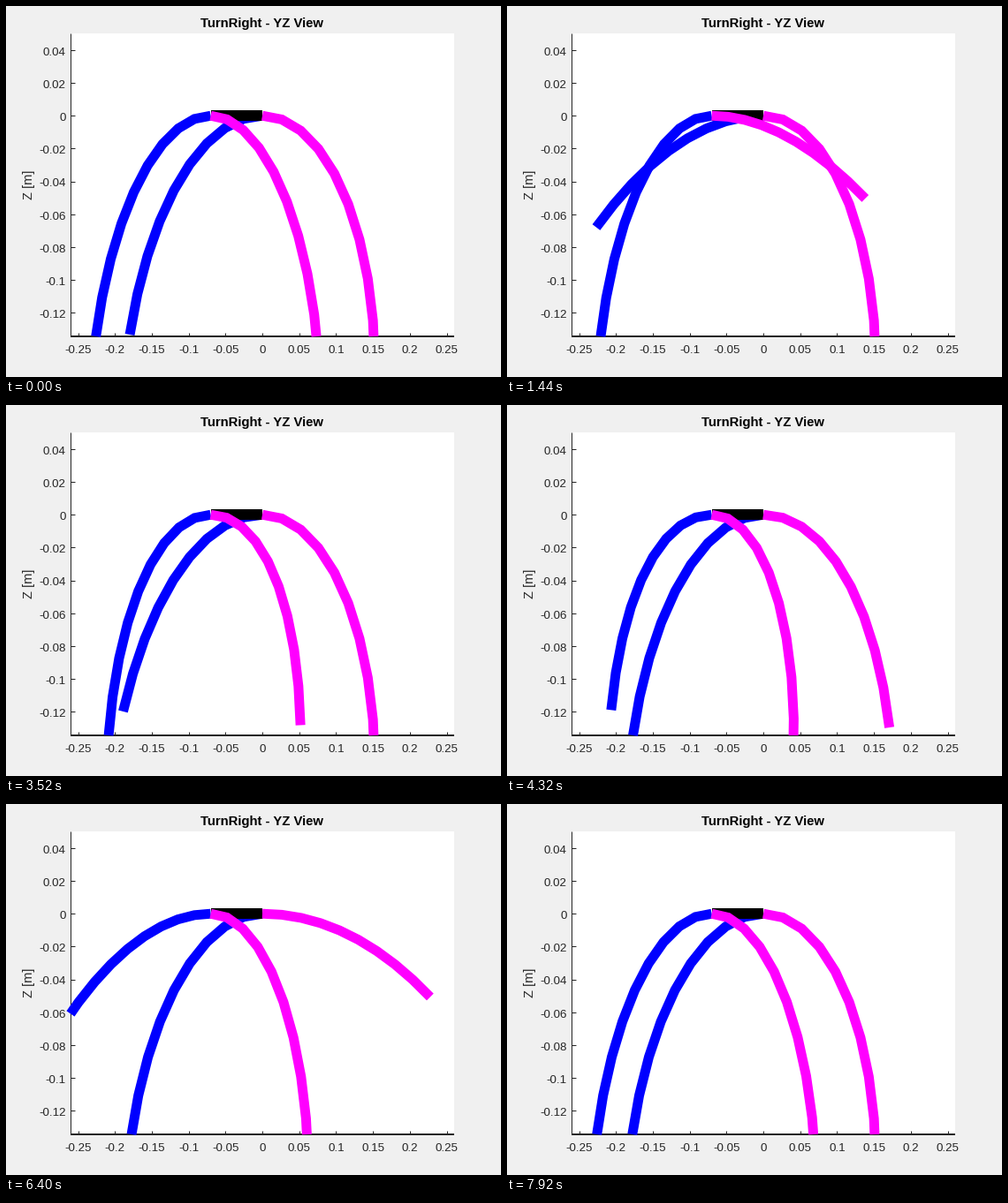
Write a matplotlib script that moves like this. It is 560x420 px and loops after 8 s.

```python
import numpy as np
import matplotlib.pyplot as plt
from matplotlib.animation import FuncAnimation

W, H, DPI = 560, 420, 100
FRAMES, INTERVAL = 100, 80
PT = 72 / DPI                      # points per pixel
LEFT, RIGHT, TOP, BOTTOM = 73, 507, 31, 374
X0, Z0, SX, SZ = 290, 124.2, 834, 1860
INK = "#262626"
SEGMENTS = 9
DROP, SPREAD = 49, 13.3            # pixels per segment: downward, sideways

plt.rcParams["font.family"] = "Liberation Sans"


class Leg:
    """Limb of constant curvature, bent down by v and sideways by u."""

    def __init__(self, ax, base, side, color, shift, reach, bend, lift,
                 u0=0.0, u1=0.0, gain=0.0, dip=0.0, z=1):
        self.base, self.side, self.shift, self.reach = base, side, shift, reach
        self.bend, self.lift = bend, lift
        self.u0, self.u1, self.gain, self.dip = u0, u1, gain, dip
        self.line, = ax.plot([], [], color=color, lw=11 * PT, zorder=z,
                             solid_capstyle="butt", solid_joinstyle="miter",
                             clip_on=False)

    def points(self, frame):
        phase = (frame + 1 + self.shift) % 100
        angle = np.pi * phase / 50
        s = max(np.sin(angle), 0.0)
        v = self.bend - self.lift * s ** 1.15
        u = (self.u0 + self.u1 * np.cos(angle) * (1 + self.gain * s)
             - self.dip * s * (1 - s))
        turn = np.hypot(u, v)
        th = (np.arange(SEGMENTS) + 0.5) * turn
        dx = self.reach * np.cos(th) + SPREAD * u / turn * np.sin(th)
        dz = DROP * v / turn * np.sin(th)
        x = self.base + self.side * np.concatenate(([0], np.cumsum(dx)))
        y = Z0 + np.concatenate(([0], np.cumsum(dz)))
        return clip(x, y)

    def update(self, frame):
        self.line.set_data(*self.points(frame))


def clip(x, y):
    """Cut the polyline where it first leaves the plot area."""
    for i in range(1, len(x)):
        t = 1.0
        if y[i] > BOTTOM:
            t = min(t, (BOTTOM - y[i - 1]) / (y[i] - y[i - 1]))
        if x[i] < LEFT:
            t = min(t, (LEFT - x[i - 1]) / (x[i] - x[i - 1]))
        if t < 1:
            end_x = x[i - 1] + t * (x[i] - x[i - 1])
            end_y = y[i - 1] + t * (y[i] - y[i - 1])
            return np.append(x[:i], end_x), np.append(y[:i], end_y)
    return x, y


def draw_axes(ax):
    ax.add_patch(plt.Rectangle((LEFT, TOP), RIGHT - LEFT, BOTTOM - TOP,
                               fc="white", ec="none", zorder=0))

    def rule(xs, ys, width=1):
        ax.plot(xs, ys, color=INK, lw=width * PT, zorder=0.5,
                solid_capstyle="butt")

    rule([LEFT, LEFT], [TOP, BOTTOM])
    rule([LEFT, RIGHT], [BOTTOM, BOTTOM], 2)
    size = 13.33 * PT
    for i in range(-5, 6):
        x = X0 + i * 0.05 * SX
        rule([x, x], [BOTTOM, BOTTOM - 4.5])
        ax.text(x, 393, f"{i * 0.05:.2f}".rstrip("0") if i else "0",
                size=size, color=INK, ha="center", va="baseline")
    for i in range(-6, 3):
        y = Z0 - i * 0.02 * SZ
        rule([LEFT, LEFT + 4.5], [y, y])
        ax.text(67.5, y + 5.7, f"{i * 0.02:.2f}".rstrip("0") if i else "0",
                size=size, color=INK, ha="right", va="baseline")
    ax.text(290, 24, "TurnRight - YZ View", size=14.85 * PT, weight="bold",
            color="black", ha="center", va="baseline")
    ax.text(25.8, 202.5, "Z [m]", size=14.67 * PT, color=INK, rotation=90,
            ha="center", va="center")


fig = plt.figure(figsize=(W / DPI, H / DPI), dpi=DPI, facecolor="#f0f0f0")
ax = fig.add_axes([0, 0, 1, 1])
ax.set_xlim(0, W)
ax.set_ylim(H, 0)
ax.axis("off")
draw_axes(ax)

near, far = X0 - 0.07 * SX, X0
BLUE, MAGENTA = "#0000ff", "#ff00ff"
ax.plot([near, far], [Z0, Z0], color="black", lw=12 * PT, zorder=2,
        solid_capstyle="butt")
legs = [
    Leg(ax, near, -1, BLUE, 50, 18.3, 0.148, 0.0895, 0.007, -0.017, 2.8, 0.05),
    Leg(ax, far, -1, BLUE, 0, 21.2, 0.148, 0.0895, 0.0215, 0.001, 1.8, 0.05),
    Leg(ax, near, 1, MAGENTA, 0, 18.3, 0.174, 0.1367, 0.001, 0.03, 1.8, z=3),
    Leg(ax, far, 1, MAGENTA, 50, 22.1, 0.174, 0.1367, dip=0.08, z=3),
]


def update(frame):
    for leg in legs:
        leg.update(frame)
    return [leg.line for leg in legs]


anim = FuncAnimation(fig, update, frames=FRAMES, interval=INTERVAL,
                     repeat=True, repeat_delay=0)
plt.show()
```
